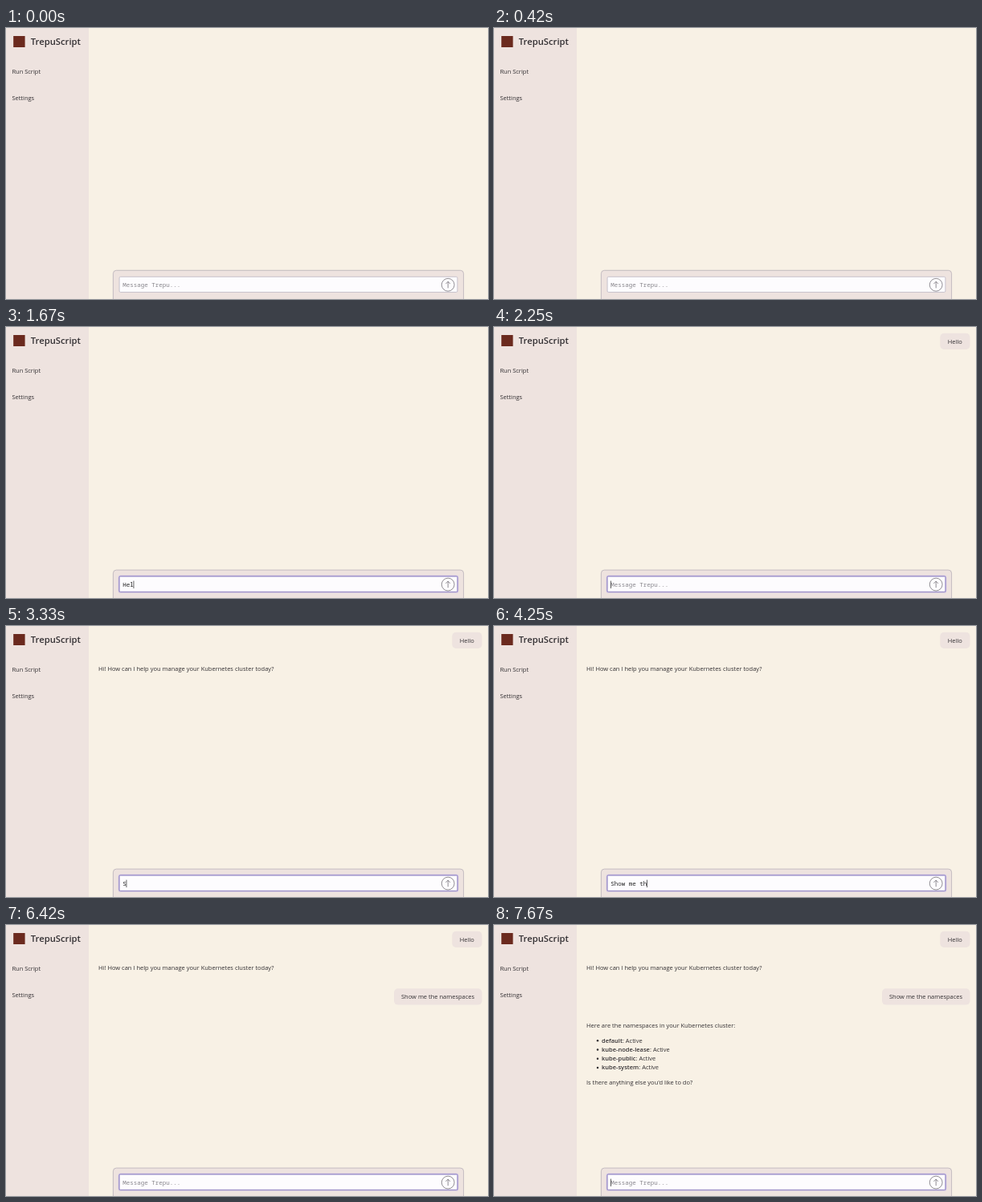
An HTML page that plays this animation: 600 by 338 pixels, repeating every 8 s.

```html
<!DOCTYPE html>
<html lang="en">
<head>
<meta charset="utf-8">
<title>TrepuScript</title>
<style>
  html, body { margin: 0; width: 100%; height: 100%; overflow: hidden; background: #f8f1e5; }
  svg { display: block; width: 100vw; height: 100vh; }
  text { font: 7.5px "Open Sans", sans-serif; fill: #333033; white-space: pre; }
  .brand { font-size: 11.25px; font-weight: 600; }
  .strong { font-weight: 600; }
  .mono { font-family: "Noto Sans Mono", monospace; fill: #222; }
  .hint { fill: #88868c; }
  .soft { fill: #eee3df; }
  .line { fill: none; stroke: #57535a; stroke-width: .65; }
  #field { fill: #fdfcfe; stroke: #bdb8c4; stroke-width: .8; }
  #field.focused { stroke: #7c6cb6; }
</style>
</head>
<body>
<svg viewBox="0 0 600 338" preserveAspectRatio="none">
  <rect class="soft" width="103" height="338"/>
  <rect x="9.2" y="10" width="14.4" height="14" fill="#6b2a1e"/>
  <text class="brand" x="30.8" y="21.3">TrepuScript</text>
  <text x="7.4" y="57.2">Run Script</text>
  <text x="7.4" y="90">Settings</text>

  <g id="hello">
    <rect class="soft" x="555.3" y="7.8" width="37.2" height="20.2" rx="5"/>
    <text x="564.8" y="20.5">Hello</text>
  </g>
  <text id="greeting" x="115" y="56.2">Hi! How can I help you manage your Kubernetes cluster today?</text>
  <g id="request">
    <rect class="soft" x="483" y="79.2" width="109.5" height="20.4" rx="5"/>
    <text x="492" y="91.9">Show me the namespaces</text>
  </g>
  <g id="answer">
    <text x="115" y="127.7">Here are the namespaces in your Kubernetes cluster:</text>
    <g id="list"></g>
    <text x="115" y="199">Is there anything else you'd like to do?</text>
  </g>

  <g id="composer">
    <rect class="soft" x="133.4" y="302.3" width="436.2" height="50" rx="4" stroke="#b8b0b8" stroke-width=".8"/>
    <rect id="halo" x="140.4" y="309.6" width="422.2" height="20.6" rx="2" fill="none" stroke="#c0b5de" stroke-width="1.2"/>
    <rect id="field" x="141.1" y="310.3" width="420.8" height="19.2" rx="1.5"/>
    <text id="hint" class="mono hint" x="145.2" y="323">Message Trepu...</text>
    <text id="draft" class="mono" x="145.2" y="323"></text>
    <rect id="caret" y="315.8" width=".7" height="9.4" fill="#222"/>
    <circle class="line" cx="550.2" cy="320.3" r="7.9"/>
    <path class="line" d="M550.2 324.4V316.3M547.4 319.1L550.2 316.3L553 319.1"/>
  </g>
  <path id="pointer" d="M0 0V8L1.9 6.4L3.2 9.2L4.4 8.6L3.2 5.9H5.8Z"/>
</svg>
<script>
const LOOP = 8000;
const FOCUS = 500;
const CHAR_WIDTH = 4.5;
const CHAR_PACE = 102;
const $ = id => document.getElementById(id);

const drafts = [
  { text: 'Hello', start: 1460, sent: 2170 },
  { text: 'Show me the namespaces', start: 3330, sent: 5670 }
];
const appearances = {
  hello: drafts[0].sent, greeting: 2330, request: drafts[1].sent, answer: 7580
};

$('list').innerHTML = ['default', 'kube-node-lease', 'kube-public', 'kube-system']
  .map((name, i) => {
    const y = 146.5 + i * 11.27;
    return `<circle cx="129" cy="${y - 2.3}" r="1.25" fill="#333033"/>
      <text x="134" y="${y}"><tspan class="strong">${name}</tspan>: Active</text>`;
  }).join('');

const between = (t, from, to) => t >= from && t < to;
const show = (id, on) => $(id).setAttribute('visibility', on ? 'visible' : 'hidden');

function typedAt(t) {
  const draft = drafts.find(d => between(t, d.start, d.sent));
  return draft ? draft.text.slice(0, 1 + Math.floor((t - draft.start) / CHAR_PACE)) : '';
}

function renderPointer(t) {
  const entering = between(t, 250, 420);
  const leaving = between(t, 1250, 1500);
  const away = entering ? (420 - t) / 170 : (t - 1250) / 250;
  show('pointer', entering || leaving);
  $('pointer').setAttribute('transform', `translate(483 ${330.4 + 6 * away ** 2})`);
}

function render(t) {
  for (const id in appearances) show(id, t >= appearances[id]);

  const typed = typedAt(t);
  const focused = t >= FOCUS;
  const blinkedOff = between(t, 2750, drafts[1].start) || between(t, 6420, 7670);
  $('draft').textContent = typed;
  show('hint', !typed);
  show('caret', focused && !blinkedOff);
  $('caret').setAttribute('x', 145.1 + typed.length * CHAR_WIDTH);

  show('halo', focused);
  $('field').classList.toggle('focused', focused);
  $('composer').setAttribute('transform', `translate(0 ${t >= drafts[0].start ? .8 : 0})`);
  renderPointer(t);
}

const begin = performance.now();
function tick() {
  render((performance.now() - begin) % LOOP);
  requestAnimationFrame(tick);
}
tick();
</script>
</body>
</html>
```
